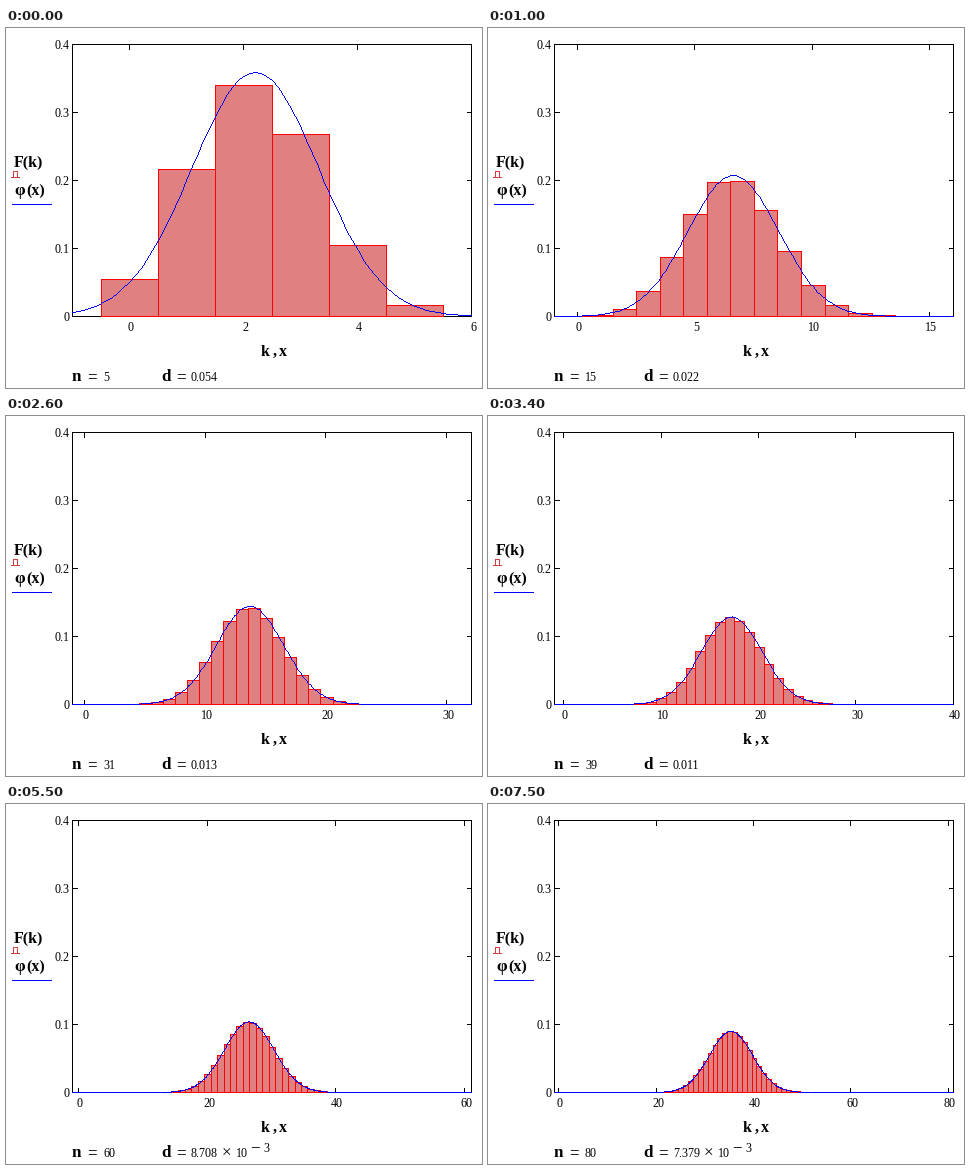
These frames come from a looping animation (476 by 360 pixels, 7600 ms). A matplotlib script:

```python
from math import comb, floor

import matplotlib.pyplot as plt
import numpy as np
from matplotlib.animation import FuncAnimation
from matplotlib.collections import PolyCollection

W, H, DPI = 476, 360, 64
LEFT, RIGHT, TOP, BASE = 66, 465, 16, 288
SPAN = 399.94
Y_UNIT = (BASE - TOP) / 0.4
TICK = 6
P = 0.44
FIRST_N, LAST_N = 5, 80
RED, PINK, BLUE = "#ff0000", "#e08080", "#0000ff"

plt.rcParams.update({
    "font.family": "Liberation Serif",
    "text.hinting": "native",
    "text.hinting_factor": 8,
})

fig = plt.figure(figsize=(W / DPI, H / DPI), dpi=DPI, facecolor="white")
ax = fig.add_axes([0, 0, 1, 1])
ax.set_xlim(0, W)
ax.set_ylim(H, 0)
ax.axis("off")


def rects(boxes, color, z):
    """Fill crisp (x0, y0, x1, y1) boxes in pixel coordinates."""
    quads = [[(a, b), (c, b), (c, d), (a, d)] for a, b, c, d in boxes]
    art = PolyCollection(quads, facecolors=color, edgecolors="none",
                         linewidths=0, antialiaseds=False, zorder=z)
    art.set_snap(False)
    return ax.add_collection(art, autolim=False)


def text(x, y, s, size=12, bold=False):
    return ax.text(x, y, s, fontsize=size * 72 / DPI, color="black",
                   weight="bold" if bold else "normal",
                   ha="left", va="baseline", zorder=5)


def near(v):
    return np.floor(np.asarray(v) + 0.5).astype(int)


def draw_static():
    rects([(LEFT, TOP, RIGHT + 1, TOP + 1), (LEFT, BASE, RIGHT + 1, BASE + 1),
           (LEFT, TOP, LEFT + 1, BASE + 1), (RIGHT, TOP, RIGHT + 1, BASE + 1)],
          "black", 1)
    for i in range(5):
        y = round(BASE - i * 0.1 * Y_UNIT)
        rects([(LEFT, y, LEFT + TICK, y + 1),
               (RIGHT + 2 - TICK, y, RIGHT + 1, y + 1)], "black", 1)
        if i:
            text(49, y + 5, f"0.{i}")
        else:
            text(58, y + 5, "0")

    # trace legend
    text(8, 139, "F(k)", 16, True)
    rects([(5, 149, 14, 150), (7, 143, 8, 149), (11, 143, 12, 149),
           (7, 143, 12, 144)], "#d04040", 1)
    text(8, 167, "φ", 17, True)
    text(20, 167, "(x)", 16, True)
    rects([(6, 176, 46, 177)], BLUE, 1)

    for x, s in ((255, "k"), (267, ","), (273, "x")):
        text(x, 328, s, 16, True)
    for x, s in ((66, "n"), (155, "d")):
        text(x, 353, s, 17, True)
        text(x + 15, 353, "=", 17)


def tick_step(span):
    return next(s for s in (1, 2, 5, 10, 20, 50) if s > span / 5)


def trim(v):
    return f"{v:.3f}".rstrip("0").rstrip(".")


def distance_text(d):
    if d >= 0.01:
        return [text(185, 353, trim(d))]
    return [text(185, 353, trim(d * 1000)), text(216, 353, "×", 17),
            text(230, 353, "10"), text(244, 348, "−", 17), text(257, 348, "3")]


def line_pixels(xs, ys):
    """Pixels of a one-pixel polyline through integer points."""
    pixels = set()
    points = list(zip(xs.tolist(), ys.tolist()))
    for (x0, y0), (x1, y1) in zip(points, points[1:]):
        m = max(abs(x1 - x0), abs(y1 - y0), 1)
        for t in range(m + 1):
            pixels.add((floor(x0 + (x1 - x0) * t / m + 0.5),
                        floor(y0 + (y1 - y0) * t / m + 0.5)))
    return [(x, y, x + 1, y + 1) for x, y in pixels if x <= RIGHT]


live = []


def update(i):
    while live:
        live.pop().remove()

    n = FIRST_N + i
    mean, var = n * P, n * P * (1 - P)

    def phi(x):
        return np.exp(-(x - mean) ** 2 / (2 * var)) / np.sqrt(2 * np.pi * var)

    def px(x):
        return near(LEFT + (x + 1) * SPAN / (n + 2))

    def py(y):
        return near(BASE - y * Y_UNIT)

    k = np.arange(n + 1)
    prob = np.array([comb(n, j) * P**j * (1 - P) ** (n - j) for j in k])

    marks = []
    for v in range(0, n + 2, tick_step(n + 2)):
        x = floor(LEFT + (v + 1) * (RIGHT - LEFT) / (n + 2))
        marks += [(x, TOP, x + 1, TOP + TICK),
                  (x, BASE + 2 - TICK, x + 1, BASE + 1)]
        s = str(v)
        live.append(text(x + 2 - 3 * len(s), 303, s))
    live.append(rects(marks, "black", 1))

    edge = px(np.arange(n + 2) - 0.5)
    bars = list(zip(edge[:-1], py(prob), edge[1:]))
    live.append(rects([(a, t, b + 1, BASE + 1) for a, t, b in bars], RED, 2))
    live.append(rects([(a + 1, t + 1, b, BASE) for a, t, b in bars
                       if t + 1 < BASE], PINK, 3))

    xs = np.linspace(-1, n + 1, 10 * (n + 2) + 1)
    live.append(rects(line_pixels(px(xs), py(phi(xs))), BLUE, 4))

    live.append(text(97, 353, str(n)))
    live.extend(distance_text(np.abs(prob - phi(k)).sum()))
    return live


draw_static()
anim = FuncAnimation(fig, update, frames=LAST_N - FIRST_N + 1, interval=100,
                     repeat=True, repeat_delay=0, cache_frame_data=False)
plt.show()
```
